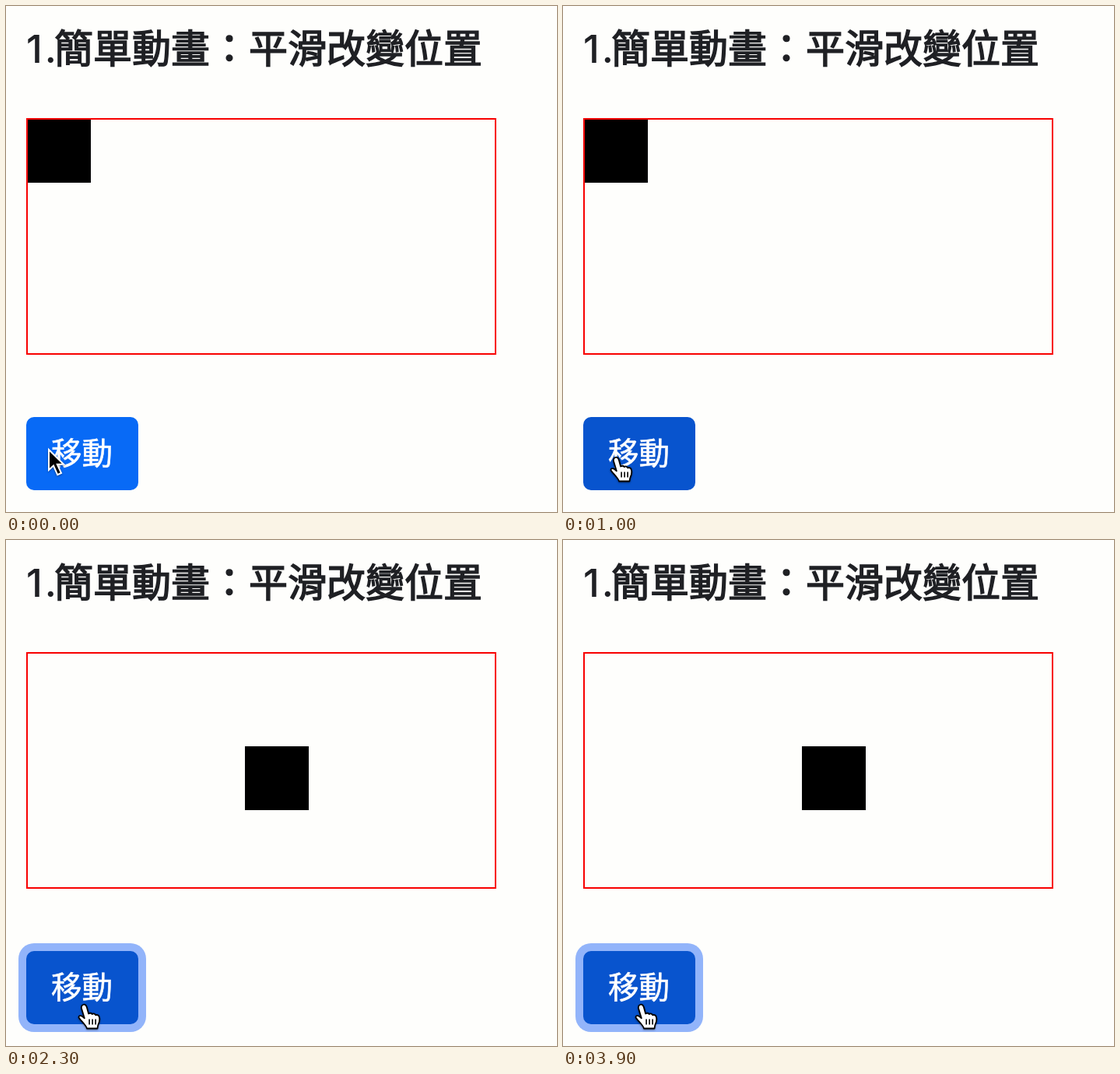
An HTML page for the animation above (4000 ms loop, 708 by 650 pixels).

```html
<!DOCTYPE html>
<html lang="zh-Hant">
<head>
<meta charset="utf-8">
<style>
html, body { margin: 0; width: 100%; height: 100%; overflow: hidden; background: #fefefc; }
svg { display: block; }
text { font-family: "Noto Sans CJK TC", "Noto Sans CJK", sans-serif; }
.title { font-size: 50px; font-weight: 500; fill: #1f2024; stroke: #1f2024; stroke-width: 1.5; }
.num { font-family: Inter, Roboto, sans-serif; stroke: none; }
.label { font-size: 39.5px; fill: #fff; stroke: #fff; stroke-width: .6; }
.cursor { filter: drop-shadow(0 1px 1px rgba(0, 0, 0, .4)); }
</style>
</head>
<body>
<svg width="708" height="650" viewBox="0 0 708 650">
  <text class="title num" x="26" y="73">1<tspan dx="3">.</tspan></text>
  <text class="title" x="62" y="73">簡單動畫：平滑改變位置</text>
  <rect x="27" y="145" width="602" height="302" fill="none" stroke="#f80000" stroke-width="2"/>
  <rect id="box" width="81.4" height="81.4" shape-rendering="crispEdges"/>
  <rect id="ring" fill="#92b4fa"/>
  <rect id="btn" x="26" y="528" width="144" height="94" rx="10"/>
  <text class="label" x="58" y="589">移動</text>
  <g id="arrow" class="cursor">
    <path d="M1 1V27L7 21.5L12.2 33.2L17 31L11.8 19.8H20.2Z" fill="#000" stroke="#fff" stroke-width="2"/>
  </g>
  <g id="hand" class="cursor">
    <path d="M6.5 1.5C9 .5 10.5 2 11.3 4.5L13.6 13C15 11.8 17.4 12 18.2 13.6C19.8 12.4 22 13 22.6 14.8C24.6 14 27 15 27.4 17.5C28.4 21 27.4 24 26 27C25.4 28.5 25.2 30 25 32H11.5C11 29.5 8.5 27 6.5 24.5C4.5 22 1.5 19.5 1 17.8C.8 15.5 3.5 15 5.3 16.3L8.3 18.8L4.6 6.5C4 4 4.6 2.2 6.5 1.5Z" fill="#fff" stroke="#000" stroke-width="1.8" stroke-linejoin="round"/>
    <path d="M14.6 20V27M18.6 20V27M22.6 20V27" stroke="#000" stroke-width="1.6"/>
  </g>
</svg>
<script>
const LOOP = 4000, STEP = 100;
const HOVER = 400, PRESS = 1260, CLICK = 1400, FADE = 150;
const $ = id => document.getElementById(id);
const clamp = v => Math.max(0, Math.min(1, v));
const ease = v => v * v * (3 - 2 * v);
const fade = (t, start) => ease(clamp((t - start) / FADE));
const mix = (a, b, k) => a.map((v, i) => v + (b[i] - v) * k);

// time, x, y of the pointer
const arrowPath = [[0, 54, 569], [100, 32, 573], [200, 14, 577], [300, 18, 576]];
const handPath = [[400, 45.5, 570], [600, 54, 574], [800, 59, 577], [1000, 60.5, 578.5], [1200, 92.5, 595.5]];

const IDLE = [8, 106, 246], OVER = [8, 84, 206], DOWN = [8, 78, 194];

function along(path, t) {
  const i = path.findIndex(p => p[0] > t);
  if (i < 0) return path[path.length - 1];
  const a = path[i - 1], b = path[i];
  return mix(a, b, (t - a[0]) / (b[0] - a[0]));
}

function place(el, x, y) {
  el.setAttribute("transform", `translate(${x} ${y})`);
}

function drawRing(grow) {
  const w = 10 * grow, ring = $("ring");
  const size = { x: 26 - w, y: 528 - w, width: 144 + 2 * w, height: 94 + 2 * w, rx: 10 + w };
  for (const key in size) ring.setAttribute(key, size[key]);
  ring.setAttribute("opacity", grow);
}

function draw(t) {
  const hovering = t >= HOVER;
  const pointer = hovering ? $("hand") : $("arrow");
  $("hand").style.display = hovering ? "" : "none";
  $("arrow").style.display = hovering ? "none" : "";
  const [, x, y] = along(hovering ? handPath : arrowPath, t);
  place(pointer, x, y);

  const press = fade(t, PRESS) - fade(t, CLICK);
  const color = mix(mix(IDLE, OVER, fade(t, HOVER)), DOWN, press);
  $("btn").setAttribute("fill", `rgb(${color.map(Math.round)})`);
  drawRing(fade(t, PRESS));

  if (t < CLICK) place($("box"), 28, 146);
  else place($("box"), 307.3, 265.3);
}

function tick() {
  const t = performance.now() % LOOP;
  draw(Math.floor(t / STEP) * STEP);
  requestAnimationFrame(tick);
}
tick();
</script>
</body>
</html>
```
